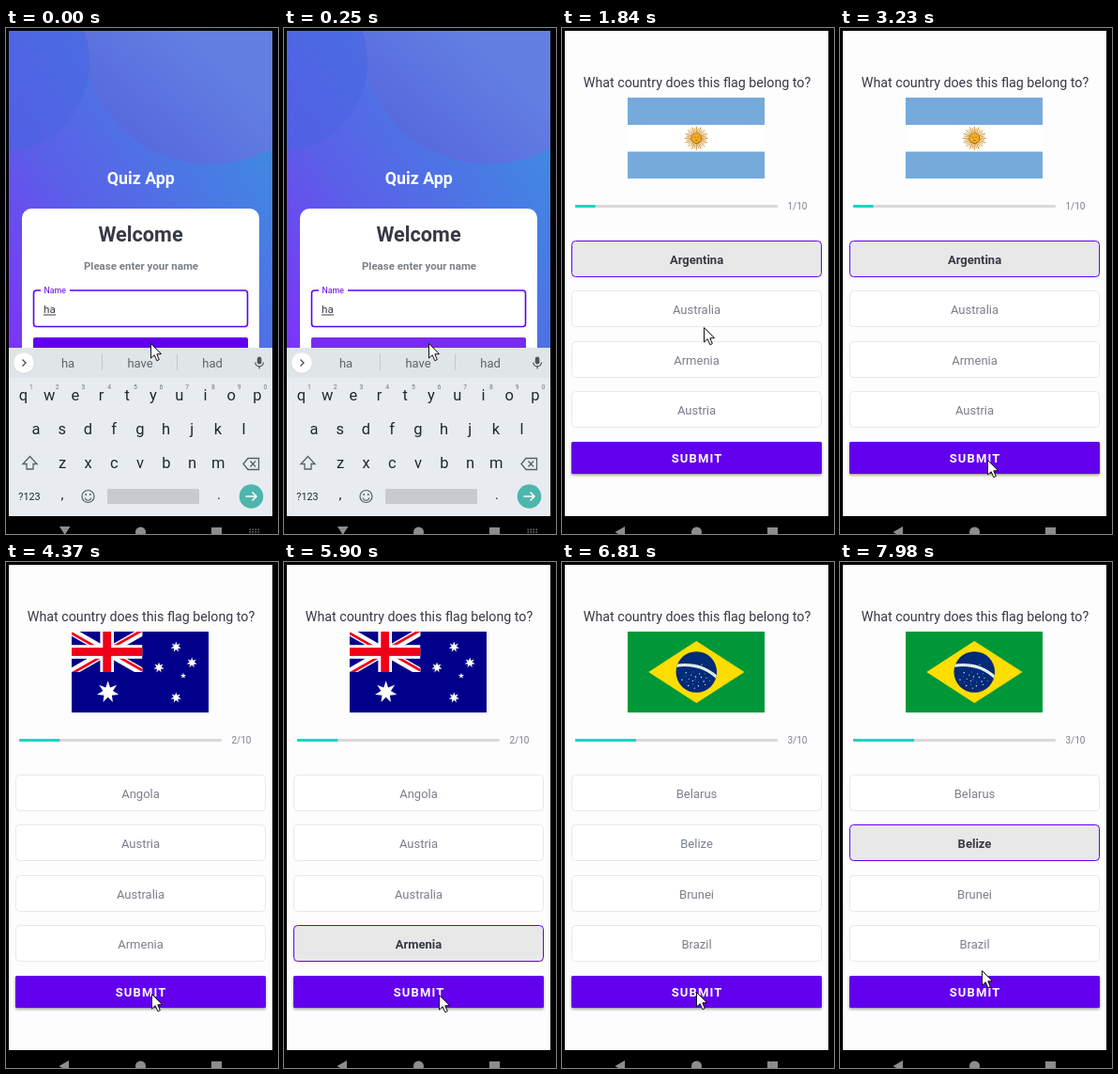
Write an HTML page with a canvas that moves like this. It is 290x538 px and loops after 8 s.

```html
<!DOCTYPE html>
<html lang="en">
<head>
<meta charset="utf-8">
<title>Quiz App</title>
<style>
html, body { margin: 0; width: 100%; height: 100%; overflow: hidden; background: #000; }
canvas { display: block; width: 290px; height: 538px; }
</style>
</head>
<body>
<canvas id="stage"></canvas>
<script>
const W = 290, H = 538, LOOP = 8000;
const PURPLE = '#6200ee', DARK = '#363a43', GREY = '#7a8089', KEY = '#1f292e';
const canvas = document.getElementById('stage');
const g = canvas.getContext('2d');
const dpr = window.devicePixelRatio || 1;
canvas.width = W * dpr;
canvas.height = H * dpr;

// Pointer positions, each held until the next: time, x, y
const POINTER = [
  [0, 154, 335], [820, 151, 345], [950, 146, 357], [1090, 143, 363], [1240, 143, 356],
  [1390, 144, 315], [1540, 146, 265], [1690, 147, 252], [1840, 151, 318], [1990, 155, 420],
  [2140, 157, 467], [3230, 157, 459], [3970, 155, 459],
  [4810, 154, 446], [4950, 152, 418], [5080, 150, 388], [5210, 149, 370], [5350, 149, 386],
  [5480, 152, 415], [5620, 160, 447], [5750, 164, 458], [5900, 165, 460],
  [6280, 160, 475], [6410, 151, 468], [6550, 145, 459], [6680, 143, 457],
  [6940, 144, 455], [7060, 146, 392], [7190, 148, 320], [7600, 147, 304],
  [7790, 149, 362], [7980, 151, 434]
];

const QUESTIONS = [
  { start: 0, pick: 1690, answer: 3380, chosen: 0, right: 0, flag: argentina,
    options: ['Argentina', 'Australia', 'Armenia', 'Austria'] },
  { start: 4370, pick: 5350, answer: 6020, chosen: 3, right: 2, flag: australia,
    options: ['Angola', 'Austria', 'Australia', 'Armenia'] },
  { start: 6680, pick: 7790, answer: Infinity, chosen: 1, right: 3, flag: brazil,
    options: ['Belarus', 'Belize', 'Brunei', 'Brazil'] }
];

function rect(x, y, w, h, color) {
  g.fillStyle = color;
  g.fillRect(x, y, w, h);
}

function disc(x, y, r, color) {
  g.fillStyle = color;
  g.beginPath();
  g.arc(x, y, r, 0, Math.PI * 2);
  g.fill();
}

function round(x, y, w, h, r, fill, stroke, width = 1) {
  g.beginPath();
  g.roundRect(x, y, w, h, r);
  if (fill) { g.fillStyle = fill; g.fill(); }
  if (stroke) { g.strokeStyle = stroke; g.lineWidth = width; g.stroke(); }
}

function trace(points, closed) {
  g.beginPath();
  for (let i = 0; i < points.length; i += 2) g.lineTo(points[i], points[i + 1]);
  if (closed) g.closePath();
}

function poly(points, color) {
  trace(points, true);
  g.fillStyle = color;
  g.fill();
}

function line(points, color, width = 1, closed = false) {
  trace(points, closed);
  g.strokeStyle = color;
  g.lineWidth = width;
  g.stroke();
}

function text(str, x, y, size, color, weight = 400, align = 'center', spacing = 0) {
  g.font = `${weight} ${size}px Roboto, "Open Sans", sans-serif`;
  g.letterSpacing = spacing + 'px';
  g.textAlign = align;
  g.fillStyle = color;
  g.fillText(str, x + spacing / 2, y);
  g.letterSpacing = '0px';
}

function star(x, y, r, tips, inner) {
  const pts = [];
  for (let i = 0; i < tips * 2; i++) {
    const a = i * Math.PI / tips - Math.PI / 2;
    const d = i % 2 ? r * inner : r;
    pts.push(x + d * Math.cos(a), y + d * Math.sin(a));
  }
  poly(pts, '#fff');
}

function argentina() {
  rect(70, 74, 146, 86, '#75aadb');
  rect(70, 103, 146, 28.5, '#fff');
  for (let i = 0; i < 32; i++) {
    const a = i * Math.PI / 16;
    const r = i % 2 ? 11 : 12.5;
    line([143.3 + 5 * Math.cos(a), 117.2 + 5 * Math.sin(a),
          143.3 + r * Math.cos(a), 117.2 + r * Math.sin(a)], i % 2 ? '#d99b2b' : '#c07f22', 0.9);
  }
  disc(143.3, 117.2, 5.8, '#a8661a');
  disc(143.3, 117.2, 5.1, '#f2ae1c');
  line([140.8, 116.2, 142.4, 116.2], '#9a5a18', 0.8);
  line([144.2, 116.2, 145.8, 116.2], '#9a5a18', 0.8);
  line([142, 119.5, 144.6, 119.5], '#9a5a18', 0.8);
}

function australia() {
  const RED = '#f00018';
  rect(70, 74, 146, 86, '#00008b');
  g.save();
  g.beginPath();
  g.rect(70, 74, 75.5, 43);
  g.clip();
  line([70, 74, 145.5, 117], '#fff', 8.4);
  line([145.5, 74, 70, 117], '#fff', 8.4);
  // Red diagonals are offset to one side in each half
  line([70, 75.6, 107.7, 97.1], RED, 2.8);
  line([107.7, 93.9, 145.5, 115.4], RED, 2.8);
  line([145.5, 72.4, 107.7, 93.9], RED, 2.8);
  line([107.7, 97.1, 70, 118.6], RED, 2.8);
  rect(100.4, 74, 14.6, 43, '#fff');
  rect(70, 88.2, 75.5, 14.6, '#fff');
  rect(103.3, 74, 8.8, 43, RED);
  rect(70, 91.1, 75.5, 8.8, RED);
  g.restore();
  star(108.7, 138.3, 12, 7, 0.45);
  star(181.3, 90.3, 5.8, 7, 0.45);
  star(163, 112.2, 5.8, 7, 0.45);
  star(198.2, 107, 5.8, 7, 0.45);
  star(181.3, 144.2, 5.8, 7, 0.45);
  star(189, 121, 3.2, 5, 0.4);
}

function brazil() {
  rect(70, 74, 146, 86, '#009739');
  poly([92.3, 117, 143.3, 84, 194.5, 117, 143.3, 150], '#fedd00');
  g.save();
  g.beginPath();
  g.arc(143.3, 117, 21.8, 0, Math.PI * 2);
  g.clip();
  rect(120, 94, 47, 47, '#012a78');
  g.beginPath();
  g.arc(131, 160.5, 51, 0, Math.PI * 2);
  g.strokeStyle = '#fff';
  g.lineWidth = 3.2;
  g.stroke();
  g.strokeStyle = '#6fae8a';
  g.lineWidth = 1;
  g.setLineDash([1.2, 1.2]);
  g.stroke();
  g.setLineDash([]);
  for (let i = 0; i < 22; i++) {
    const a = i * 2.4, r = 3.4 * Math.sqrt(i);
    disc(142 + r * Math.cos(a), 125 + r * 0.62 * Math.sin(a), 0.45 + (i % 3) * 0.15, '#dfe5f2');
  }
  disc(149, 109, 0.6, '#fff');
  g.restore();
}

function submitButton(label, pressed) {
  g.save();
  g.shadowColor = 'rgba(0,0,0,.38)';
  g.shadowBlur = 3 * dpr;
  g.shadowOffsetY = 1.6 * dpr;
  round(10, 440, 267, 34, 1.5, pressed ? '#7a2bf1' : PURPLE);
  g.restore();
  text(label, 143.5, 462, 13, '#fff', 700, 'center', 1.16);
}

function quiz(t) {
  const n = QUESTIONS.findLastIndex(q => t >= q.start);
  const q = QUESTIONS[n];
  const picked = t >= q.pick, answered = t >= q.answer;
  rect(3, 3, 281, 516, '#fdfdfd');
  text('What country does this flag belong to?', 144, 63, 14.25, DARK);
  q.flag();
  round(14, 188, 216, 3, 1, '#d9d9d9');
  round(14, 188, 21.7 * (n + 1), 3, 1, '#03dac5');
  text(`${n + 1}/10`, 240.5, 193, 10, GREY, 400, 'left');
  q.options.forEach((name, i) => {
    const y = 226.5 + i * 53.4;
    const on = picked && i === q.chosen;
    let fill = on ? '#e8e8e8' : '#fff', edge = on ? PURPLE : '#e8e8e8';
    if (answered && i === q.right) fill = edge = '#4caf50';
    else if (answered && on) fill = edge = '#f44336';
    round(10.5, Math.floor(y) + 0.5, 266, 38, 4, fill, edge);
    text(name, 143.5, Math.floor(y) + 25, 13, on ? DARK : GREY, on ? 700 : 400);
  });
  submitButton(answered ? 'GO TO NEXT QUESTION' : 'SUBMIT', answered && t < q.answer + 130);
}

function welcome(t) {
  const sky = g.createLinearGradient(3, 330, 284, 140);
  sky.addColorStop(0, '#7b36f6');
  sky.addColorStop(0.4, '#5b5fe8');
  sky.addColorStop(1, '#4088e2');
  rect(3, 3, 281, 516, sky);
  g.save();
  g.beginPath();
  g.rect(3, 3, 281, 516);
  g.clip();
  const glow = g.createLinearGradient(80, 140, 200, 3);
  glow.addColorStop(0, '#5361dc');
  glow.addColorStop(1, '#6280e2');
  disc(218, 8, 137, glow);
  disc(-8, 36, 97, 'rgba(74,100,226,.55)');
  g.restore();

  text('Quiz App', 143.7, 166, 17.8, '#fff', 700);
  round(17, 192, 253, 194, 10, '#fff');
  text('Welcome', 143.5, 227, 21.7, DARK, 700);
  text('Please enter your name', 144, 257, 11.5, GREY, 700);
  round(29.5, 279, 228, 38.5, 3, null, PURPLE, 1.6);
  rect(37, 276, 31, 6, '#fff');
  text('Name', 40.5, 282, 8.8, PURPLE, 400, 'left');
  text('ha', 40, 303, 11.7, DARK, 400, 'left');
  rect(40, 304.5, 13, 1, DARK);
  round(29, 329, 229, 34, 2, t >= 250 ? '#7a2bf1' : PURPLE);
  text('START', 143.5, 351, 12, '#fff', 700, 'center', 1);
}

function letters(row, x, y) {
  [...row].forEach((c, i) => text(c, x + i * 27.7, y, 16.5, KEY));
}

function keyboard(drop) {
  g.save();
  g.beginPath();
  g.rect(3, 3, 281, 516);
  g.clip();
  g.translate(0, drop);
  rect(3, 340, 281, 180, '#e8ecf0');
  rect(3, 340, 281, 32, '#e0e5e8');

  disc(19, 356.5, 11.3, 'rgba(0,0,0,.07)');
  disc(19, 356, 10.8, '#fff');
  line([17.5, 352.5, 21, 356, 17.5, 359.5], '#444d52', 1.3);
  ['ha', 'have', 'had'].forEach((s, i) => text(s, 66 + i * 77, 361, 13, '#5a666b'));
  rect(102, 347, 1, 17, '#c2c8cb');
  rect(182, 347, 1, 17, '#c2c8cb');
  round(267.8, 349.5, 4.6, 8, 2.3, '#4c575c');
  g.beginPath();
  g.arc(270.1, 355.5, 4.3, 0, Math.PI);
  g.strokeStyle = '#4c575c';
  g.lineWidth = 1.2;
  g.stroke();
  line([270.1, 360, 270.1, 362.5], '#4c575c', 1.2);

  letters('qwertyuiop', 18.5, 396);
  letters('asdfghjkl', 32, 432);
  letters('zxcvbnm', 60, 468);
  [...'1234567890'].forEach((c, i) => text(c, 27 + i * 27.7, 384, 6.8, '#6a757a'));

  line([25.5, 455.5, 33, 463.5, 29, 463.5, 29, 469, 22, 469, 22, 463.5, 18, 463.5], '#566166', 1.3, true);
  line([253, 463.5, 258, 457.5, 269.5, 457.5, 269.5, 469.5, 258, 469.5], '#566166', 1.3, true);
  line([260.5, 460.5, 266, 466.5], '#566166', 1.3);
  line([266, 460.5, 260.5, 466.5], '#566166', 1.3);

  text('?123', 25, 502, 10.8, KEY);
  text(',', 60, 501, 15, KEY);
  text('.', 227, 501, 15, KEY);
  g.strokeStyle = '#566166';
  g.lineWidth = 1.2;
  g.beginPath();
  g.arc(87.5, 498, 6.5, 0, Math.PI * 2);
  g.stroke();
  g.beginPath();
  g.arc(87.5, 499, 3.3, 0.2, Math.PI - 0.2);
  g.stroke();
  disc(85.2, 496, 1, '#566166');
  disc(89.8, 496, 1, '#566166');
  round(108, 490, 98, 16, 1.5, '#c7cbcf');
  disc(261.5, 498, 12.8, '#4db6ac');
  line([255.5, 498, 267, 498], '#fff', 1.5);
  line([262.5, 493.5, 267, 498, 262.5, 502.5], '#fff', 1.5);
  g.restore();
}

function navBar(typing) {
  const color = '#8d8d8d';
  rect(0, 519, W, 19, '#000');
  poly(typing ? [57, 530, 68.5, 530, 62.7, 539] : [67, 530, 67, 542, 56.5, 536], color);
  disc(143.5, 536, 5.5, color);
  rect(219, 531, 11, 8, color);
  if (typing) {
    for (let i = 0; i < 12; i++) rect(259.5 + (i % 4) * 3, 532.5 + Math.floor(i / 4) * 2.6, 1.6, 1.4, '#777');
  }
}

function pointer(t) {
  const [, x, y] = POINTER.findLast(p => t >= p[0]);
  g.save();
  g.translate(x + 0.5, y + 0.5);
  const shape = [0, 0, 0, 15.5, 3.7, 12.2, 6.3, 18.2, 8.8, 17.1, 6.3, 11.3, 11, 11.1];
  poly(shape, '#fff');
  line(shape, '#111', 1, true);
  g.restore();
}

function draw(t) {
  g.setTransform(dpr, 0, 0, dpr, 0, 0);
  rect(0, 0, W, H, '#000');
  if (t < 680) welcome(t);
  if (t >= 540) {
    g.save();
    if (t < 680) {
      g.beginPath();
      g.rect(3, 3, 281, 516);
      g.clip();
      g.globalAlpha = 0.6;
      g.translate(0, 20);
    }
    quiz(t);
    g.restore();
  }
  if (t < 820) keyboard(t < 680 ? 0 : 90);
  navBar(t < 680);
  pointer(t);
}

function tick(now) {
  draw(now % LOOP);
  requestAnimationFrame(tick);
}
draw(0);
requestAnimationFrame(tick);
</script>
</body>
</html>
```
